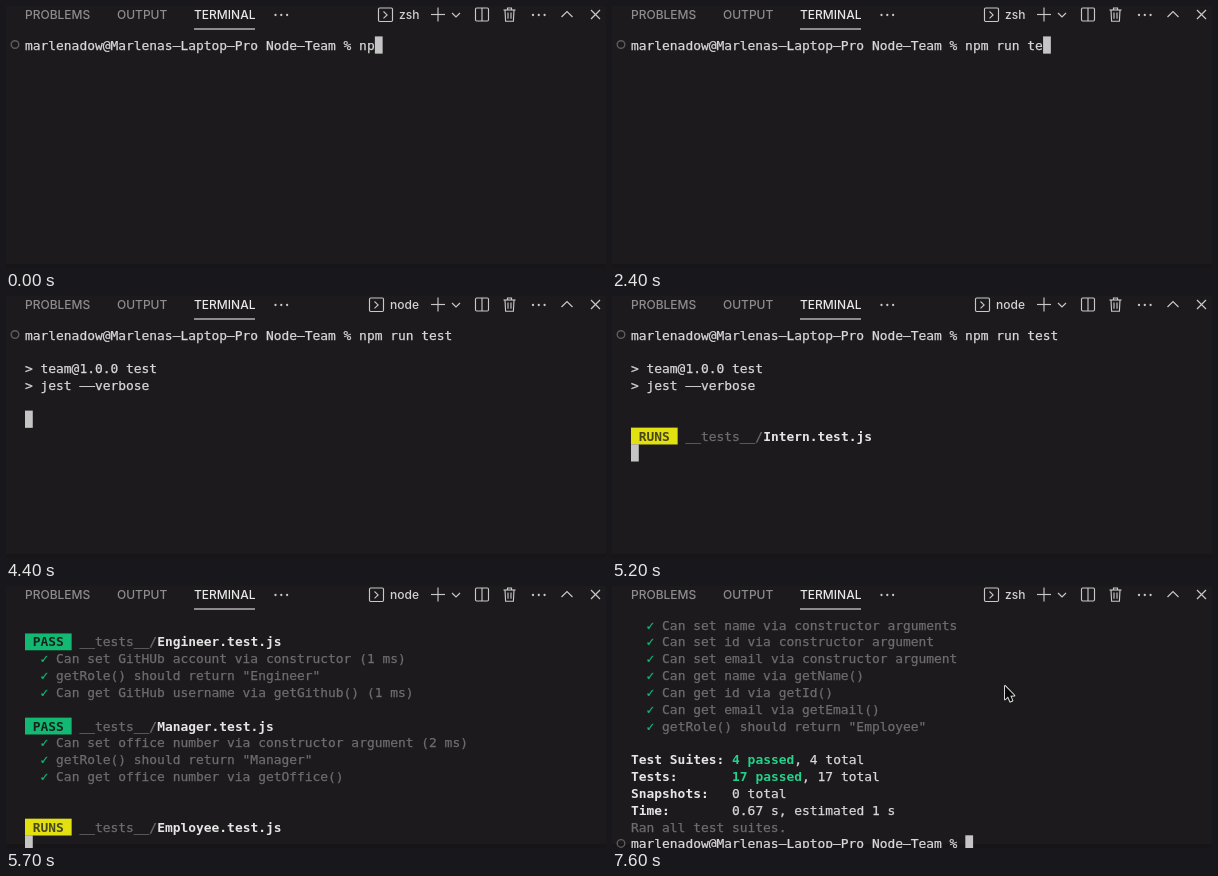
An HTML page with a canvas for the animation above (8 s loop, 600x262 px).

```html
<!DOCTYPE html>
<html lang="en">
<head>
<meta charset="utf-8">
<title>Terminal test run</title>
<style>
  html, body { margin: 0; width: 100%; height: 100%; overflow: hidden; background: #1c1a1c; }
  canvas { display: block; width: 600px; height: 262px; }
</style>
</head>
<body>
<canvas id="stage"></canvas>
<script>
const W = 600, H = 262, LOOP = 8000;
const LEFT = 19, TOP = 30.6, CELL_W = 7.775, CELL_H = 16.84, ROWS = 14;
const MONO = '12.915px "DejaVu Sans Mono", monospace';
const SANS = 'Inter, "Liberation Sans", sans-serif';
const ICON = '#c8c8c8';

const canvas = document.getElementById('stage');
const ctx = canvas.getContext('2d');
const dpr = window.devicePixelRatio || 1;
canvas.width = W * dpr;
canvas.height = H * dpr;

const STYLES = {
  text: { color: '#d8d8d8' },
  bold: { color: '#e6e6e6', bold: true },
  dim: { color: '#6e6d6e' },
  tick: { color: '#12bd78' },
  good: { color: '#23d18b', bold: true },
  pass: { color: '#17251e', bold: true, back: '#13b972' },
  runs: { color: '#48471c', bold: true, back: '#e2e010' }
};

const PROMPT = 'marlenadow@Marlenas-Laptop-Pro Node-Team % ';
const COMMAND = 'npm run test';
const KEY_TIMES = [200, 500, 900, 1100, 1400, 1600, 1800, 2400, 2600, 2800];
const ENTER = 3600, NPM = 4400, JEST = 5100, DONE = 5900, EXIT = 6500;
const PASS_TIMES = [5500, 5600, 5700, DONE];

const SUITES = [
  ['Intern', [
    'Can set school via constructor (2 ms)',
    'getRole() should return "Intern"',
    'Can get school via getSchool() (1 ms)']],
  ['Engineer', [
    'Can set GitHUb account via constructor (1 ms)',
    'getRole() should return "Engineer"',
    'Can get GitHub username via getGithub() (1 ms)']],
  ['Manager', [
    'Can set office number via constructor argument (2 ms)',
    'getRole() should return "Manager"',
    'Can get office number via getOffice()']],
  ['Employee', [
    'Can instantiate Employee instance (1 ms)',
    'Can set name via constructor arguments',
    'Can set id via constructor argument',
    'Can set email via constructor argument',
    'Can get name via getName()',
    'Can get id via getId()',
    'Can get email via getEmail()',
    'getRole() should return "Employee"']]
];

const plain = text => [['text', text]];
const suiteLine = (style, label, name) =>
  [[style, ` ${label} `], ['dim', ' __tests__/'], ['bold', name + '.test.js']];
const totalLine = (label, passed, rest) =>
  [['bold', label.padEnd(13)], ['good', passed], ['text', rest]];
const countUntil = (times, t) => times.filter(at => t >= at).length;

// All output so far; the text cursor sits at the end of the last line.
function terminalLines(t) {
  const typed = COMMAND.slice(0, 2 + countUntil(KEY_TIMES, t));
  const lines = [plain(PROMPT + typed)];
  if (t < ENTER) return lines;
  if (t < NPM) return [...lines, []];

  lines.push([], plain('> team@1.0.0 test'), plain('> jest --verbose'), []);
  if (t < JEST) return [...lines, []];

  const passed = countUntil(PASS_TIMES, t);
  for (const [name, tests] of SUITES.slice(0, passed)) {
    lines.push(suiteLine('pass', 'PASS', name));
    for (const test of tests) lines.push([['tick', '  ✓ '], ['dim', test]]);
    lines.push([]);
  }
  if (t < DONE) return [...lines, [], suiteLine('runs', 'RUNS', SUITES[passed][0]), []];

  lines.push(
    totalLine('Test Suites:', '4 passed', ', 4 total'),
    totalLine('Tests:', '17 passed', ', 17 total'),
    totalLine('Snapshots:', '', '0 total'),
    totalLine('Time:', '', '0.67 s, estimated 1 s'),
    [['dim', 'Ran all test suites.']],
    t < EXIT ? [] : plain(PROMPT)
  );
  return lines;
}

function drawLine(line, y) {
  let x = LEFT;
  for (const [name, text] of line) {
    const style = STYLES[name];
    const width = text.length * CELL_W;
    if (style.back) {
      ctx.fillStyle = style.back;
      ctx.fillRect(x, y, width, CELL_H);
    }
    ctx.font = (style.bold ? 'bold ' : '') + MONO;
    ctx.fillStyle = ctx.strokeStyle = style.color;
    // The terminal face has wide hyphens and slightly heavy stems.
    const shown = text.replace(/-/g, '–');
    ctx.fillText(shown, x, y + 12.9);
    if (!style.bold) {
      ctx.lineWidth = 0.25;
      ctx.strokeText(shown, x, y + 12.9);
    }
    x += width;
  }
  return x;
}

function drawTerminal(t) {
  const visible = terminalLines(t).slice(-ROWS);
  let x = LEFT, y = TOP;
  visible.forEach((line, row) => {
    y = TOP + row * CELL_H;
    x = drawLine(line, y);
    if (line.length && line[0][1].startsWith(PROMPT)) {
      ctx.beginPath();
      ctx.arc(9, y + 7.9, 3.8, 0, Math.PI * 2);
      stroke('#5e5d5e', 1.4);
    }
  });
  ctx.fillStyle = '#c6c5c6';
  ctx.fillRect(x, y - 0.2, CELL_W, CELL_H + 0.4);
}

function stroke(color, width) {
  ctx.strokeStyle = color;
  ctx.lineWidth = width;
  ctx.stroke();
}

function path(...points) {
  ctx.beginPath();
  points.forEach(([x, y], i) => i ? ctx.lineTo(x, y) : ctx.moveTo(x, y));
}

function icon(...points) {
  path(...points);
  stroke(ICON, 1.15);
}

function frameIcon(x, y, w, h) {
  ctx.beginPath();
  ctx.roundRect(x, y, w, h, 1.2);
  stroke(ICON, 1.15);
}

function label(text, x, color) {
  ctx.font = `500 12px ${SANS}`;
  ctx.fillStyle = color;
  ctx.fillText(text, x, 13.3);
}

function dots(x) {
  ctx.fillStyle = ICON;
  for (let i = 0; i < 3; i++) {
    ctx.beginPath();
    ctx.arc(x + i * 5.8, 9, 1.15, 0, Math.PI * 2);
    ctx.fill();
  }
}

function drawHeader(t) {
  label('PROBLEMS', 19, '#8e8d8e');
  label('OUTPUT', 111, '#8e8d8e');
  label('TERMINAL', 188, '#e7e7e7');
  ctx.fillStyle = '#d8d8d8';
  ctx.fillRect(188, 22.4, 61, 1.2);
  dots(269.5);

  const busy = t >= ENTER + 100 && t < EXIT + 100;
  const x = busy ? 363.5 : 372.5;
  frameIcon(x, 2, 14, 13.5);
  icon([x + 5, 5.5], [x + 8.6, 8.9], [x + 5, 12.3]);
  label(busy ? 'node' : 'zsh', x + 20.6, '#d2d2d2');

  icon([425, 8.5], [439, 8.5]);
  icon([432, 1.5], [432, 15.5]);
  icon([446, 7], [450, 11], [454, 7]);

  frameIcon(469.5, 2, 13, 13);
  icon([476, 2], [476, 15]);

  icon([497.5, 4], [509.5, 4]);
  icon([501.5, 4], [501.5, 2], [505.5, 2], [505.5, 4]);
  icon([499, 4], [499.6, 15.2], [507.4, 15.2], [508, 4]);
  icon([502, 6.5], [502, 12.8]);
  icon([505, 6.5], [505, 12.8]);

  dots(527);
  icon([555.5, 11], [561, 5.5], [566.5, 11]);
  icon([585, 4], [594, 13]);
  icon([594, 4], [585, 13]);
}

function drawPointer(t) {
  if (t < 7200) return;
  const p = Math.min(1, Math.floor((t - 7200) / 100) / 4);
  const q = 1 - p;
  const bend = (a, b, c) => q * q * a + 2 * p * q * b + p * p * c;
  ctx.save();
  ctx.translate(bend(40, 235, 393), bend(163, 8, 100));
  path([0, 0], [0, 13.4], [3, 10.6], [5.2, 15.6], [7.4, 14.6], [5.3, 9.8], [9.4, 9.6]);
  ctx.closePath();
  ctx.lineJoin = 'round';
  stroke('#e8e8e8', 1.8);
  ctx.fillStyle = '#080808';
  ctx.fill();
  ctx.restore();
}

function draw(t) {
  ctx.setTransform(dpr, 0, 0, dpr, 0, 0);
  ctx.fillStyle = '#1c1a1c';
  ctx.fillRect(0, 0, W, H);
  ctx.fillStyle = '#171517';
  ctx.fillRect(0, 258, W, 4);
  drawHeader(t);
  drawTerminal(t);
  drawPointer(t);
}

const start = performance.now();
function frame() {
  draw((performance.now() - start) % LOOP);
  requestAnimationFrame(frame);
}
frame();
</script>
</body>
</html>
```
